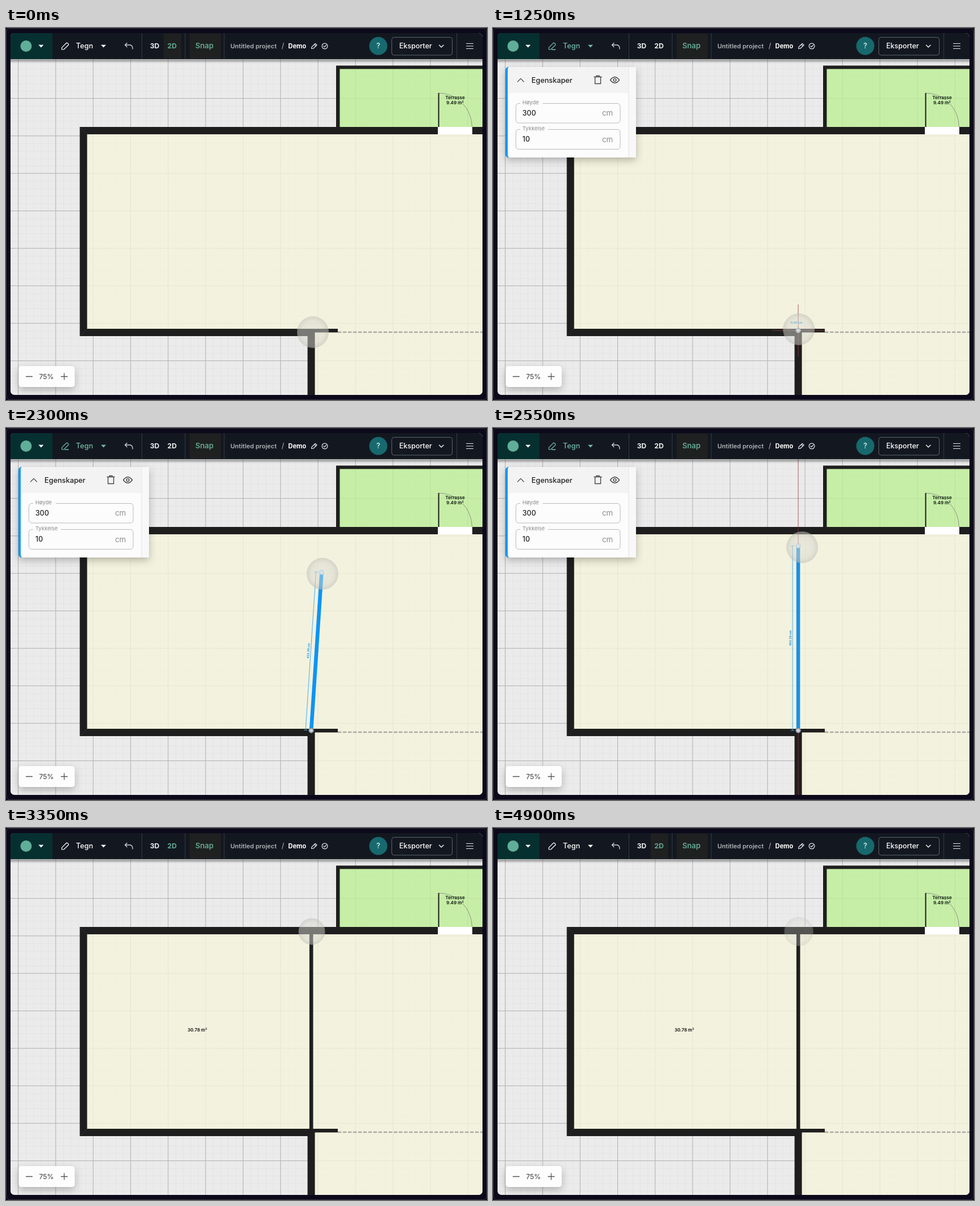
An HTML page for the animation above (4950 ms loop, 851 px wide and 658 px high).

```html
<!DOCTYPE html>
<html lang="no">
<head>
<meta charset="utf-8">
<title>Floor plan editor</title>
<style>
  html, body { margin: 0; width: 100%; height: 100%; overflow: hidden; background: #0c0a1a; }
  svg { display: block; width: 851px; height: 658px; font-family: Inter, "Open Sans", sans-serif; }
  .mid { text-anchor: middle; }
  .line { fill: none; stroke-linecap: round; stroke-linejoin: round; }
  .med { font-weight: 500; }
  .semi { font-weight: 600; }
  .bold { font-weight: 700; }
  .wall { fill: #1e1e1e; }
  .dim { font-size: 5.1px; font-weight: 700; fill: #1d8fe0; }
  .field { fill: #fcfcfc; stroke: #b9b9b9; }
  .legend { font-size: 9.5px; fill: #8a8a8a; }
  .unit { font-size: 13.3px; fill: #8d8d8d; }
  .guide { stroke: #8b3a42; fill: none; }
</style>
</head>
<body>
<svg viewBox="0 0 851 658" xmlns="http://www.w3.org/2000/svg">
  <defs>
    <clipPath id="window"><rect x="8" y="9" width="835" height="640" rx="7"/></clipPath>
    <pattern id="minor" x="21.6" y="58.2" width="13.26" height="13.26" patternUnits="userSpaceOnUse">
      <path d="M0 .5H13.26M.5 0V13.26" stroke="#e0e0e0" stroke-dasharray="2 1" fill="none"/>
    </pattern>
    <linearGradient id="drop" x2="0" y2="1">
      <stop stop-color="#000" stop-opacity=".3"/>
      <stop offset="1" stop-color="#000" stop-opacity="0"/>
    </linearGradient>
    <radialGradient id="touch">
      <stop stop-color="#e0e0d8" stop-opacity=".46"/>
      <stop offset=".7" stop-color="#d6d6ce" stop-opacity=".5"/>
      <stop offset="1" stop-color="#bcbcb6" stop-opacity=".55"/>
    </radialGradient>
    <filter id="soft" x="-30%" y="-30%" width="160%" height="170%">
      <feDropShadow dx="0" dy="5" stdDeviation="7" flood-opacity=".25"/>
    </filter>
  </defs>

  <rect width="851" height="658" fill="#0c0a1a"/>
  <rect x=".5" y=".5" width="850" height="657" rx="7" fill="none" stroke="#33323d"/>

  <g clip-path="url(#window)">
    <rect x="8" y="9" width="835" height="640" fill="#ebebeb"/>
    <rect x="8" y="55" width="835" height="594" fill="url(#minor)"/>
    <path id="major" stroke="#b2b2b2" fill="none"/>

    <path d="M137 182H843V649H540V538H137Z" fill="#f5f4db" fill-opacity=".8"/>
    <path d="M587 70H843V180H587Z" fill="#bfef97" fill-opacity=".8"/>
    <path class="wall" d="M584 66.5H843V72.5H590.5V175H843V188H143.5V532H587V538.5H546.5V649H533.5V545H130.5V175H584Z"/>
    <path d="M131 544.5L143.5 532M131 175.5L143.5 188" stroke="#3a3a3a" stroke-width=".6"/>
    <path d="M587 538H843" stroke="#aaaaa4" stroke-width="2.6" stroke-dasharray="6.4 2.6"/>
    <rect x="764" y="175" width="61" height="13" fill="#fff"/>
    <path d="M765.5 115A59.5 60 0 0 1 824.5 175" fill="none" stroke="#8d9488"/>
    <path d="M765.5 115V175" stroke="#1a1a1a" stroke-width="2"/>
    <g class="mid bold" font-size="8" fill="#1c2a1c">
      <text x="794.5" y="125.5">Terrasse</text>
      <text x="794.5" y="134.5">9.49 m²</text>
    </g>

    <g id="built">
      <rect class="wall" x="536.8" y="187" width="6.6" height="346"/>
      <text class="mid bold" x="338.5" y="360" font-size="7.8" fill="#222">30.78 m²</text>
    </g>

    <path id="axis" class="guide" d="M540 55V649" opacity=".75"/>
    <g id="hair">
      <path class="guide" d="M540 489V581M494 535H587" opacity=".8"/>
      <text id="zero" class="dim mid" x="537" y="522.5">0.00 cm</text>
    </g>
    <g id="draft">
      <path id="beam" stroke="#0b94f7" stroke-width="6.6"/>
      <path id="ruler" stroke="#3ba3ea" stroke-width=".9" fill="none"/>
      <text id="length" class="dim mid"></text>
      <circle id="tip" r="4" fill="#cfe6f5" stroke="#7fbdea"/>
    </g>
    <g id="anchor">
      <circle cx="540" cy="535" r="4.3" fill="#a9b4ba" stroke="#6f7f89"/>
      <path d="M537.5 535H542.5M540 532.5V537.5" stroke="#f3f5f6"/>
    </g>

    <rect x="8" y="55" width="835" height="8" fill="url(#drop)"/>

    <rect x="22.5" y="598" width="99" height="37" rx="5" fill="#fdfdfd" filter="url(#soft)"/>
    <path class="line" d="M35.5 616.5H46.5M97.5 616.5H108.5M103 611V622" stroke="#555" stroke-width="1.3"/>
    <text class="mid" x="71.5" y="620.5" font-size="12.3" fill="#3c3c3c">75%</text>

    <g id="panel">
      <g filter="url(#soft)">
        <path d="M28 69H253V229H28Q22 229 22 223V75Q22 69 28 69Z" fill="#0a95f2"/>
        <path d="M30 69H253V229H30Q26 229 26 224V74Q26 69 30 69Z" fill="#fcfcfc"/>
      </g>
      <path d="M30 69H240V115H26V74Q26 69 30 69Z" fill="#f3f3f3"/>
      <path d="M240 69H253V229H240Z" fill="#f8f8f8"/>
      <path d="M240 69V229" stroke="#e4e4e4"/>
      <path class="line" d="M43.5 95L49 89.5L54.5 95" stroke="#555" stroke-width="1.3"/>
      <text class="med" x="68" y="96.7" font-size="12.8" fill="#222">Egenskaper</text>
      <g class="line" stroke="#444" stroke-width="1.4">
        <path d="M179 86.5H192M183 86V84.5H188V86M180.5 87V98.5H190.5V87"/>
        <path d="M207.5 92Q215.5 81.5 223.5 92Q215.5 102.5 207.5 92Z"/>
        <circle cx="215.5" cy="92" r="2.4"/>
      </g>
      <rect class="field" x="40.5" y="133.5" width="184.5" height="34.5" rx="5"/>
      <rect class="field" x="40.5" y="179.5" width="184.5" height="35" rx="5"/>
      <path d="M48 133.5H88M48 179.5H97" stroke="#fcfcfc" stroke-width="3"/>
      <text class="legend" x="52" y="135">Høyde</text>
      <text class="legend" x="52" y="181">Tykkelse</text>
      <g class="med" font-size="12.5" fill="#222">
        <text x="52" y="155">300</text>
        <text x="52" y="201">10</text>
      </g>
      <text class="unit" x="193" y="155">cm</text>
      <text class="unit" x="193" y="201.5">cm</text>
    </g>

    <rect x="8" y="9" width="835" height="46" fill="#131820"/>
    <rect x="8" y="9" width="74" height="46" fill="#06302f"/>
    <circle cx="35.5" cy="32" r="10" fill="#60ae99"/>
    <path d="M57.5 29.8H66.5L62 34.6Z" fill="#fff"/>
    <rect id="glow" x="279" y="10" width="31" height="44" fill="#1f2020"/>
    <rect x="325" y="10" width="55" height="44" fill="#1f2020"/>
    <path d="M240.5 9V55M317 9V55M386 9V55M797.5 9V55" stroke="#353b43"/>

    <g id="tool">
      <path id="pen" class="line" d="M98.8 38V34.6L106.9 26.5Q107.7 25.8 108.5 26.5L110.4 28.4Q111.1 29.2 110.4 30L102.3 38Z" stroke="currentColor" stroke-width="1.2"/>
      <path id="stroke" d="M104 38.2H111" stroke="currentColor" stroke-width="1.4"/>
      <text class="med" x="123.8" y="36.3" font-size="12.7" fill="currentColor">Tegn</text>
      <path d="M168 29.8H177L172.500 34.600Z" fill="currentColor"/>
    </g>
    <path class="line" d="M214 26.500L210.500 30L214 33.500M210.500 30H219Q224 30 224 37" stroke="#ccd0d3" stroke-width="1.300"/>
    <g class="semi mid" font-size="12.200">
      <text class="bold" x="263" y="36" fill="#eef0f1">3D</text>
      <text class="bold" id="flat" x="293.700" y="36">2D</text>
      <text x="351.200" y="36.300" font-size="13.100" fill="#62a994">Snap</text>
    </g>
    <g font-size="11">
      <text class="semi" x="397" y="35.600" fill="#aeb3b8">Untitled project</text>
      <text x="487.500" y="36" font-size="13" fill="#aeb3b8">/</text>
      <text class="bold" x="499.300" y="35.600" font-size="11.200" fill="#fff">Demo</text>
    </g>
    <g class="line" stroke="#e4e7e9" stroke-width="1.200">
      <path d="M540.500 36.500L541 33.500L547.200 27.500L550 30.200L543.700 36.200ZM545.500 29.200L548.300 32"/>
      <circle cx="564" cy="32" r="4.900"/>
      <path d="M561.800 32L563.500 33.700L566.500 30.500"/>
      <path d="M766.500 30.300L770.200 34L774 30.300" stroke-width="1.600"/>
      <path d="M814.500 27.500H826.500M814.500 32H826.500M814.500 36.500H826.500"/>
    </g>
    <circle cx="658.700" cy="31.800" r="16" fill="#17696e"/>
    <text class="mid semi" x="658.700" y="36.300" font-size="12.500" fill="#c9e6e2">?</text>
    <rect x="682.500" y="16.500" width="107" height="31.500" rx="4" fill="none" stroke="#5d646b"/>
    <text class="med" x="695.700" y="36.300" font-size="12.500" fill="#fff">Eksporter</text>

    <circle id="cursor" fill="url(#touch)"/>
  </g>
</svg>

<script>
  const LOOP = 4950, OPEN = 600, PRESS = 1150, DRAG = 1300, DONE = 3200;
  const PX_PER_CM = 0.662, START = { x: 540, y: 535 };
  const $ = id => document.getElementById(id);
  const show = (id, on) => $(id).style.display = on ? '' : 'none';
  const set = (id, attrs) => {
    for (const k in attrs) $(id).setAttribute(k, attrs[k]);
  };

  // [time, x, y]
  const path = [
    [0, 543, 538], [450, 543, 538], [1000, 541, 533], [1300, 541, 533],
    [1550, 561, 424], [1850, 574, 331], [2300, 560, 258],
    [2550, 547, 211], [2850, 541, 183], [LOOP, 541, 183]
  ];
  // [time, radius]
  const press = [
    [0, 28], [1050, 28], [1130, 23.5], [1240, 28], [3050, 28],
    [3180, 23.5], [3380, 23.5], [3550, 28], [4600, 28], [LOOP, 25.6]
  ];
  const fade = [[0, 1], [4600, 1], [4900, .6], [LOOP, .5]];
  const glow = [[0, 1], [500, 1], [OPEN, 0], [3500, 0], [3800, 1], [LOOP, 1]];

  // Cubic interpolation with slopes that never overshoot
  function slope(keys, i, c) {
    if (i < 1 || i > keys.length - 2) return 0;
    const rate = j => (keys[j + 1][c] - keys[j][c]) / (keys[j + 1][0] - keys[j][0]);
    const a = rate(i - 1), b = rate(i);
    return a * b > 0 ? 2 * a * b / (a + b) : 0;
  }
  function at(keys, t, c = 1) {
    let i = 0;
    while (i < keys.length - 2 && t >= keys[i + 1][0]) i++;
    const [p, q] = [keys[i], keys[i + 1]], h = q[0] - p[0], u = (t - p[0]) / h;
    const s = u * u * (3 - 2 * u);
    return p[c] + (q[c] - p[c]) * s
      + h * u * (1 - u) * ((1 - u) * slope(keys, i, c) - u * slope(keys, i + 1, c));
  }

  function drawDraft(end) {
    const dx = end.x - START.x, dy = end.y - START.y, len = Math.hypot(dx, dy) || 1;
    const ux = dx / len, uy = dy / len;
    const side = (p, d) => `${p.x + uy * d} ${p.y - ux * d}`;
    const tick = p => `M${side(p, 7)}L${side(p, 13)}`;
    const line = `M${START.x} ${START.y}L${end.x} ${end.y}`;
    set('beam', { d: line });
    set('ruler', { d: `M${side(START, 10)}L${side(end, 10)}${tick(START)}${tick(end)}` });
    const mid = { x: START.x + dx / 2, y: START.y + dy / 2 };
    const angle = Math.atan2(dy, dx) * 180 / Math.PI;
    set('length', { transform: `translate(${side(mid, 12.5)}) rotate(${angle})` });
    $('length').textContent = (len / PX_PER_CM).toFixed(2) + ' cm';
    set('tip', { cx: end.x, cy: end.y });
  }

  function render(t) {
    const x = at(path, t, 1), y = at(path, t, 2);
    const drawing = t >= OPEN && t < DONE, dragging = t >= DRAG && t < DONE;
    const end = { x: x - 1.5, y: y - 2.5 };
    const snapped = dragging && t > 2000 && Math.abs(end.x - START.x) < 8;
    if (snapped) end.x = START.x;

    show('panel', drawing);
    show('hair', drawing && !dragging);
    show('zero', t >= PRESS);
    show('anchor', drawing);
    show('draft', dragging);
    show('axis', snapped);
    show('built', t >= DONE);
    show('stroke', drawing);
    if (dragging) drawDraft(end);

    set('beam', { stroke: snapped ? '#1a90e6' : '#0b94f7' });
    set('tool', { color: drawing ? '#72b8a5' : '#ffffff' });
    set('pen', { fill: drawing ? 'currentColor' : 'none' });
    set('flat', { fill: drawing ? '#eef0f1' : '#62a994' });
    set('glow', { opacity: at(glow, t) });
    set('cursor', { cx: x, cy: y, r: at(press, t), opacity: at(fade, t) });
  }

  const gap = 66.3;
  let grid = '';
  for (let x = 21.6; x < 843; x += gap) grid += `M${x} 55V649`;
  for (let y = 58.2; y < 649; y += gap) grid += `M8 ${y}H843`;
  set('major', { d: grid });

  const origin = performance.now();
  function tick() {
    render((performance.now() - origin) % LOOP);
    requestAnimationFrame(tick);
  }
  tick();
</script>
</body>
</html>
```
